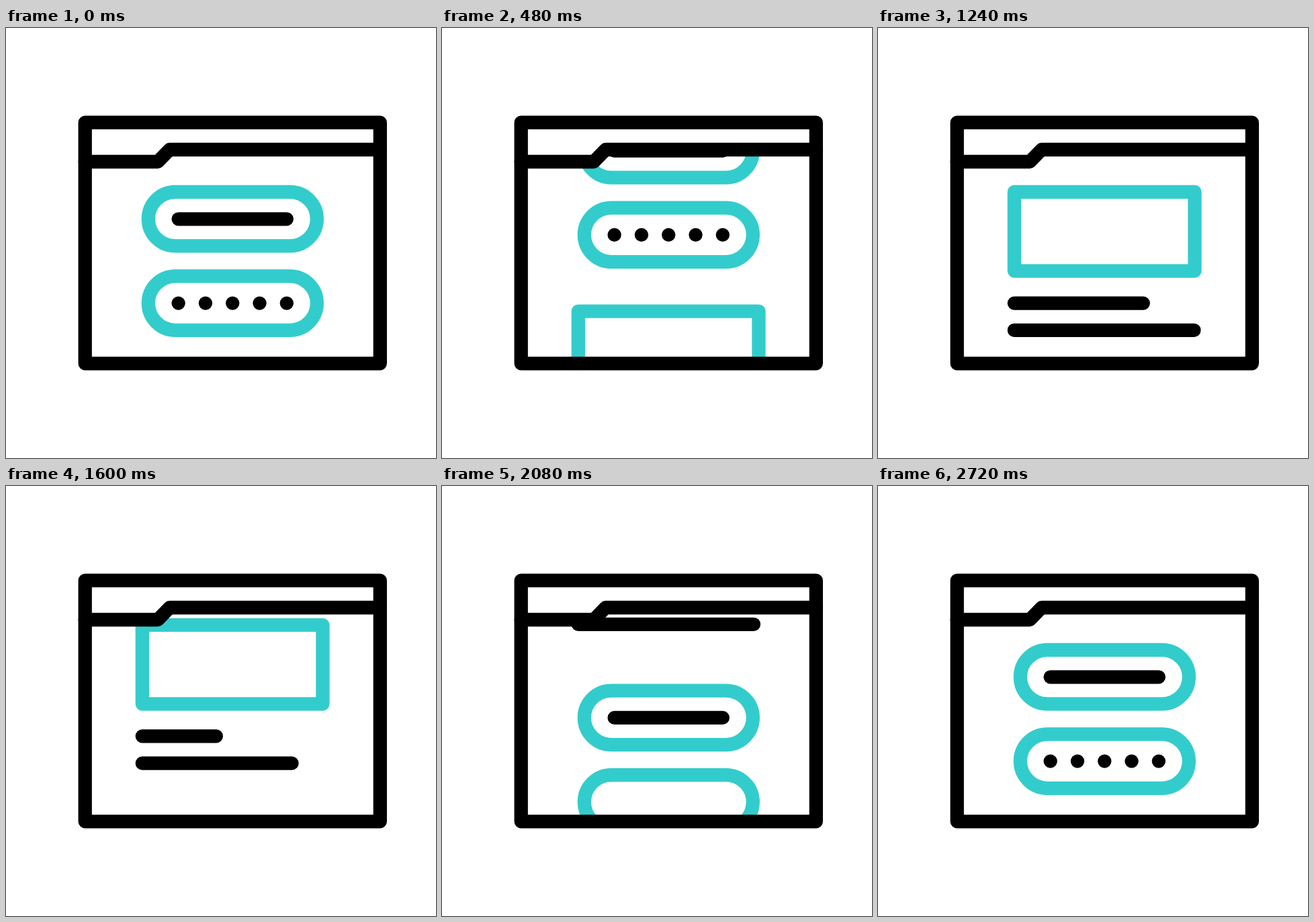
An HTML page with a canvas that plays this animation: 640 by 640 pixels, repeating every 3 s.

```html
<!DOCTYPE html>
<html lang="en">
<head>
<meta charset="utf-8">
<title>Scrolling web form</title>
<style>
  html, body { margin: 0; width: 100%; height: 100%; overflow: hidden; background: #fff; }
  canvas { display: block; width: 640px; height: 640px; }
</style>
</head>
<body>
<canvas id="stage" width="640" height="640"></canvas>
<script>
const ctx = document.getElementById('stage').getContext('2d');
const LOOP = 3000, STEP = 20;
const BLACK = '#000', TEAL = '#33cccc';
const LEFT = 202.8, RIGHT = 471.4;
const TAB = [[117.7, 199], [226, 199], [243.5, 181], [556.8, 181]];

// Smooth progress from 0 to 1 between two times
function ease(t, from, to) {
  const x = Math.min(1, Math.max(0, (t - from) / (to - from)));
  return x * x * (3 - 2 * x);
}

// Swings between min and max, shortest at the given time and every second after it
function swing(t, shortest, min, max) {
  const phase = (((t - shortest) % 1000) + 1000) % 1000;
  const k = phase < 500 ? ease(phase, 0, 500) : 1 - ease(phase, 500, 1000);
  return min + (max - min) * k;
}

function trace(points) {
  ctx.beginPath();
  points.forEach(([x, y]) => ctx.lineTo(x, y));
}

function bar(x1, x2, y) {
  ctx.strokeStyle = BLACK;
  trace([[x1, y], [x2, y]]);
  ctx.stroke();
}

function box(color, x1, y1, x2, y2, radius = 0) {
  ctx.strokeStyle = color;
  ctx.beginPath();
  if (radius) ctx.roundRect(x1, y1, x2 - x1, y2 - y1, radius);
  else ctx.rect(x1, y1, x2 - x1, y2 - y1);
  ctx.stroke();
}

function drawForm(shift, dots) {
  for (const y of [244, 369.4]) {
    box(TEAL, 211.8, y + shift, 462.8, y + 80.4 + shift, 40.2);
  }
  bar(256.6, 417.8, 284.3 + shift);
  ctx.fillStyle = BLACK;
  for (let i = 0; i < dots; i++) {
    ctx.beginPath();
    ctx.arc(256.6 + 40.3 * i, 409.6 + shift, 10.2, 0, Math.PI * 2);
    ctx.fill();
  }
}

function drawArticle(shift, t) {
  box(TEAL, LEFT, 244 + shift, RIGHT, 361.6 + shift);
  bar(LEFT, LEFT + swing(t, 601, 110, 211), 409.6 + shift);
  bar(LEFT, LEFT + swing(t, 700, 217.4, 268.5), 449.8 + shift);
}

function draw(t) {
  ctx.fillStyle = '#fff';
  ctx.fillRect(0, 0, 640, 640);
  ctx.lineWidth = 20.3;
  ctx.lineCap = ctx.lineJoin = 'round';

  ctx.save();
  trace([...TAB, [556.8, 499.3], [117.7, 499.3]]);
  ctx.clip();
  if (t < 900) {
    drawForm(-289 * ease(t, 200, 900), 5);
  } else {
    const dots = Math.min(5, Math.max(0, Math.floor((t - 2220) / 100)));
    drawForm(280.5 * (1 - ease(t, 1567, 2300)), dots);
  }
  if (t > 200 && t < 2300) {
    drawArticle(274 * (1 - ease(t, 200, 900)) - 287 * ease(t, 1396, 2301), t);
  }
  ctx.restore();

  box(BLACK, 117.7, 140.7, 556.8, 499.3);
  trace(TAB);
  ctx.stroke();
}

const start = performance.now();
function tick() {
  const t = (performance.now() - start) % LOOP;
  draw(Math.floor(t / STEP) * STEP);
  requestAnimationFrame(tick);
}
tick();
</script>
</body>
</html>
```
